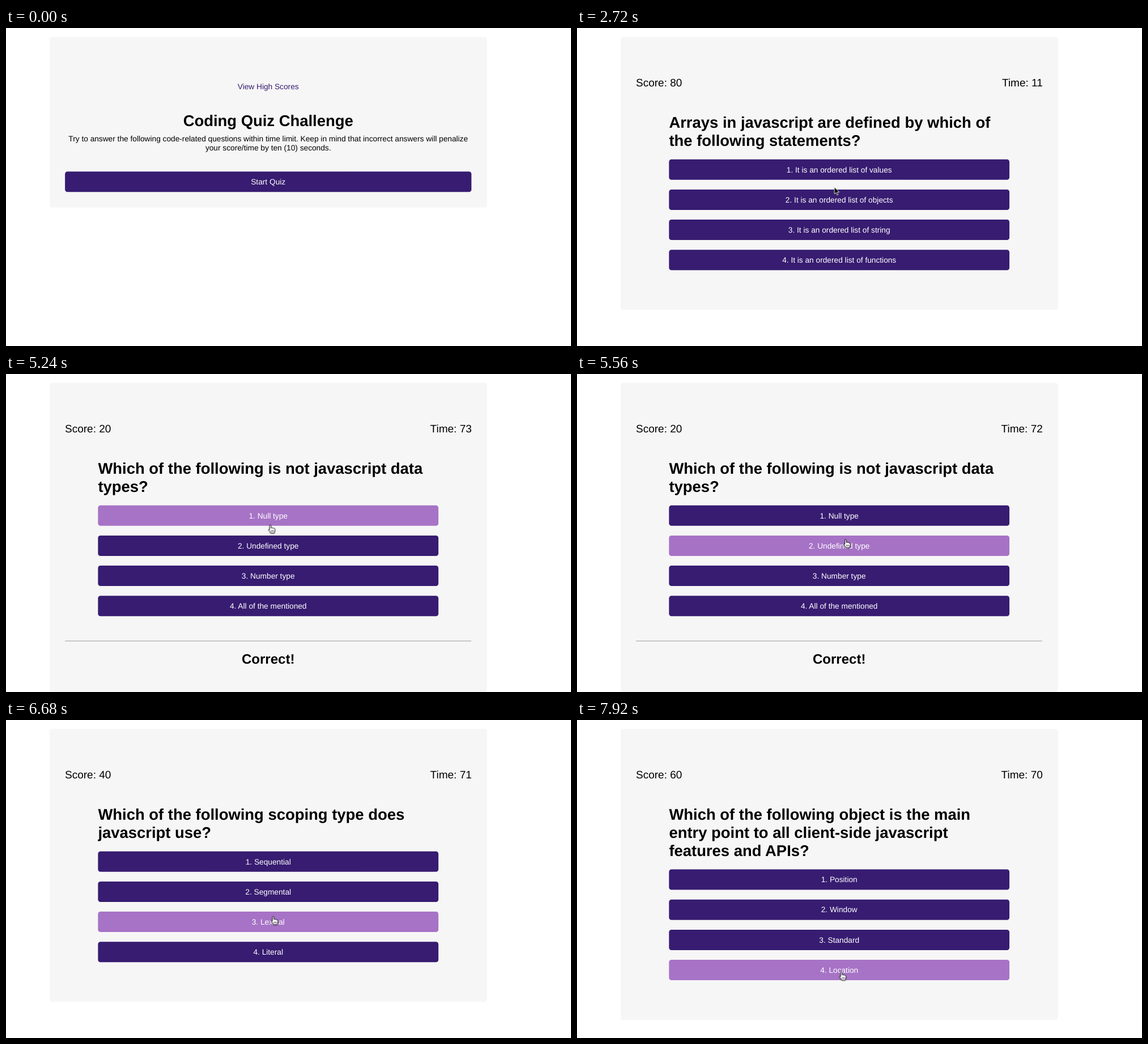
An HTML page that plays this animation: 997 by 561 pixels, repeating every 8000 ms.

```html
<!DOCTYPE html>
<html lang="en">
<head>
<meta charset="utf-8">
<title>Coding Quiz</title>
<style>
  html, body { margin: 0; width: 100%; height: 100%; overflow: hidden; background: #fff; }
  svg { display: block; }
  text {
    font: 13.714px Arial, "Liberation Sans", sans-serif;
    text-rendering: geometricPrecision;
    white-space: pre;
  }
  .mid { text-anchor: middle; }
  .end { text-anchor: end; }
  .card { fill: #f6f6f6; }
  .btn, .link { fill: #371c71; }
  .label { fill: #fff; }
  .title { font-size: 27.43px; font-weight: bold; }
  .hud { font-size: 19px; }
  .verdict { font-size: 24px; font-weight: bold; }
  .rule { fill: #9c9c9c; }
  #pointer { filter: drop-shadow(0 1px 1px rgba(0, 0, 0, .3)); }
</style>
</head>
<body>
<svg width="997" height="561" viewBox="0 0 997 561">
  <g id="screens"></g>
  <g id="pointer">
    <path id="arrow" d="M0 0V12L2.7 9.6 4.6 14 6.6 13.1 4.8 8.9H8.5Z" stroke="#fff" stroke-width=".9"/>
    <g id="hand" stroke="#000" stroke-width=".9" stroke-linejoin="round">
      <path fill="#fff" d="M-1.3 8.6V1.2A1.25 1.2 0 0 1 1.2 1.2V5.4C1.6 4.4 3.4 4.5 3.6 5.7 4.2 4.9 5.8 5.1 6 6.3 6.8 5.7 8.1 6.2 8.1 7.4V10C8.1 11.6 7 12.4 6.9 14.4H.6C.4 12.8-1.6 11-3 9.2-3.8 8.1-2.4 7-1.3 8.6Z"/>
      <path fill="none" stroke-width=".7" d="M1.6 9.2v3M3.5 9.2v3M5.4 9.2v3"/>
    </g>
  </g>
</svg>
<script>
const LOOP = 8000, FADE = 300, NOTICE = 1920, LEAD = 56;
const MIDDLE = 462.7, LINE = 31.8, PITCH = 53.15, BUTTON = 36;
const DARK = '#371c71', LIGHT = '#a773c6';
const HOLD = 'steps(1, end)';

const byId = id => document.getElementById(id);
const screens = byId('screens');
const buttons = [];

function add(parent, tag, attrs, content = '') {
  const el = document.createElementNS('http://www.w3.org/2000/svg', tag);
  for (const key in attrs) el.setAttribute(key, attrs[key]);
  el.textContent = content;
  return parent.appendChild(el);
}

const write = (parent, cls, x, y, content) =>
  add(parent, 'text', { class: cls, x, y }, content);

// Each frame is [ms, style, easing to the next frame].
function play(el, frames) {
  el.animate(frames.map(([ms, style, easing = 'linear']) =>
    ({ offset: ms / LOOP, easing, ...style })),
    { duration: LOOP, iterations: Infinity });
}

// Shows an element only within the given [from, to] spans.
function during(el, ...spans) {
  const frames = [];
  const set = (ms, opacity) => frames.push([ms, { opacity }, HOLD]);
  if (spans[0][0] > 0) set(0, 0);
  for (const [from, to] of spans) {
    set(from, 1);
    set(to, to < LOOP ? 0 : 1);
  }
  if (spans[spans.length - 1][1] < LOOP) set(LOOP, 0);
  play(el, frames);
}

// Lists the spans of time in which a test holds.
function spansOf(test, from = 0, to = LOOP) {
  const spans = [];
  let start = null;
  for (let t = from; t <= to; t += 4) {
    const held = t < to && test(t);
    if (held && start === null) start = t;
    if (!held && start !== null) {
      spans.push([start, t]);
      start = null;
    }
  }
  return spans;
}

// Pointer moves: start, end, and the place it goes to.
const entry = { x: 337, y: 521 };
const moves = [
  { from: 1040, to: 1360, x: 386, y: 433 },
  { from: 1360, to: 1960, x: 454.3, y: 280.7 },
  { from: 3230, to: 3440, x: 464.5, y: 259.5 },
  { from: 5220, to: 5320, x: 474, y: 292 },
  { from: 6190, to: 6420, x: 471.5, y: 346.5 },
  { from: 7060, to: 7800, x: 466.5, y: 444.5 }
];

function pointerY(t) {
  return moves.reduce((y, m) => {
    const part = Math.min(1, Math.max(0, (t - m.from) / (m.to - m.from)));
    return y + (m.y - y) * part;
  }, entry.y);
}

const isOver = (b, t) => {
  const y = pointerY(t);
  return t >= moves[0].from && y >= b.y && y <= b.y + BUTTON;
};

function hover(el, on, off) {
  const frames = [
    [0, { fill: DARK }, HOLD],
    [on, { fill: DARK }, 'ease'],
    [Math.min(on + FADE, off), { fill: LIGHT }],
    [off, { fill: LIGHT }, 'ease']
  ];
  if (off < LOOP)
    frames.push([Math.min(off + FADE, LOOP), { fill: DARK }], [LOOP, { fill: DARK }]);
  play(el, frames);
}

function card(parent, bottom) {
  add(parent, 'rect', { class: 'card', x: 77, y: 15.7, width: 771.7, height: bottom - 15.7, rx: 4.5 });
}

function button(parent, y, width, label, from, to) {
  const el = add(parent, 'rect',
    { class: 'btn', x: MIDDLE - width / 2, y, width, height: BUTTON, rx: 4.3 });
  write(parent, 'label mid', MIDDLE, y + 22.7, label);
  buttons.push({ el, y, from, to });
}

function startScreen(to) {
  const g = add(screens, 'g');
  card(g, 316.8);
  write(g, 'link mid', MIDDLE, 108.3, 'View High Scores');
  write(g, 'title mid', MIDDLE, 172.8, 'Coding Quiz Challenge');
  write(g, 'mid', MIDDLE, 200.2, 'Try to answer the following code-related questions within time limit. Keep in mind that incorrect answers will penalize');
  write(g, 'mid', MIDDLE, 215.9, 'your score/time by ten (10) seconds.');
  button(g, 253.3, 717.2, 'Start Quiz', 0, to);
  during(g, [0, to]);
}

function verdict(parent, shift, from, to) {
  const g = add(parent, 'g');
  card(g, 561 + shift);
  add(g, 'rect', { class: 'rule', x: 104.3, y: 470.5 + shift, width: 716.8, height: 1 });
  write(g, 'verdict mid', MIDDLE, 511 + shift, 'Correct!');
  during(g, [from, to]);
}

const questions = [
  {
    from: 2560,
    lines: ['Arrays in javascript are defined by which of', 'the following statements?'],
    options: ['values', 'objects', 'string', 'functions'].map(s => 'It is an ordered list of ' + s)
  },
  {
    from: 4080,
    lines: ['Which of the following is not javascript data', 'types?'],
    options: ['Null type', 'Undefined type', 'Number type', 'All of the mentioned']
  },
  {
    from: 5760,
    lines: ['Which of the following scoping type does', 'javascript use?'],
    options: ['Sequential', 'Segmental', 'Lexical', 'Literal']
  },
  {
    from: 6880,
    lines: ['Which of the following object is the main', 'entry point to all client-side javascript', 'features and APIs?'],
    options: ['Position', 'Window', 'Standard', 'Location']
  }
];

function questionScreen({ from, lines, options }, index) {
  const to = index + 1 < questions.length ? questions[index + 1].from : LOOP;
  const g = add(screens, 'g');
  const shift = (lines.length - 2) * LINE;
  card(g, 497.2 + shift);
  if (index) {
    // The timer of the earlier answer also clears a newer notice.
    const timer = questions[Math.max(1, index - 1)].from;
    verdict(g, shift, from, Math.min(to, timer + NOTICE));
  }
  // The score of the last game stays until the first right answer.
  write(g, 'hud', 104, 103.3, 'Score: ' + (index * 20 || 80));
  lines.forEach((line, i) => write(g, 'title', 162.4, 176.3 + i * LINE, line));
  options.forEach((option, i) =>
    button(g, 231.8 + shift + i * PITCH, 600.7, `${i + 1}. ${option}`, from, to));
  during(g, [from, to]);
}

startScreen(questions[0].from);
questions.forEach(questionScreen);

// The clock keeps its old value until the first tick, one second after the start.
for (let i = 0; i < 6; i++) {
  const tick = questions[0].from + i * 1000;
  const label = write(screens, 'hud end', 821.8, 103.3, 'Time: ' + (i ? 75 - i : 11));
  during(label, [tick, Math.min(tick + 1000, LOOP)]);
}

for (const b of buttons)
  for (const span of spansOf(t => isOver(b, t), Math.max(0, b.from - LEAD), b.to))
    hover(b.el, ...span);

const onButton = t => buttons.some(b => t >= b.from && t < b.to && isOver(b, t));
during(byId('hand'), ...spansOf(onButton));
during(byId('arrow'), ...spansOf(t => t >= moves[0].from && !onButton(t)));

const place = ({ x, y }) => ({ transform: `translate(${x}px, ${y}px)` });
const path = [[0, place(entry)]];
moves.forEach((m, i) =>
  path.push([m.from, place(i ? moves[i - 1] : entry)], [m.to, place(m)]));
path.push([LOOP, place(moves[moves.length - 1])]);
play(byId('pointer'), path);
</script>
</body>
</html>
```
